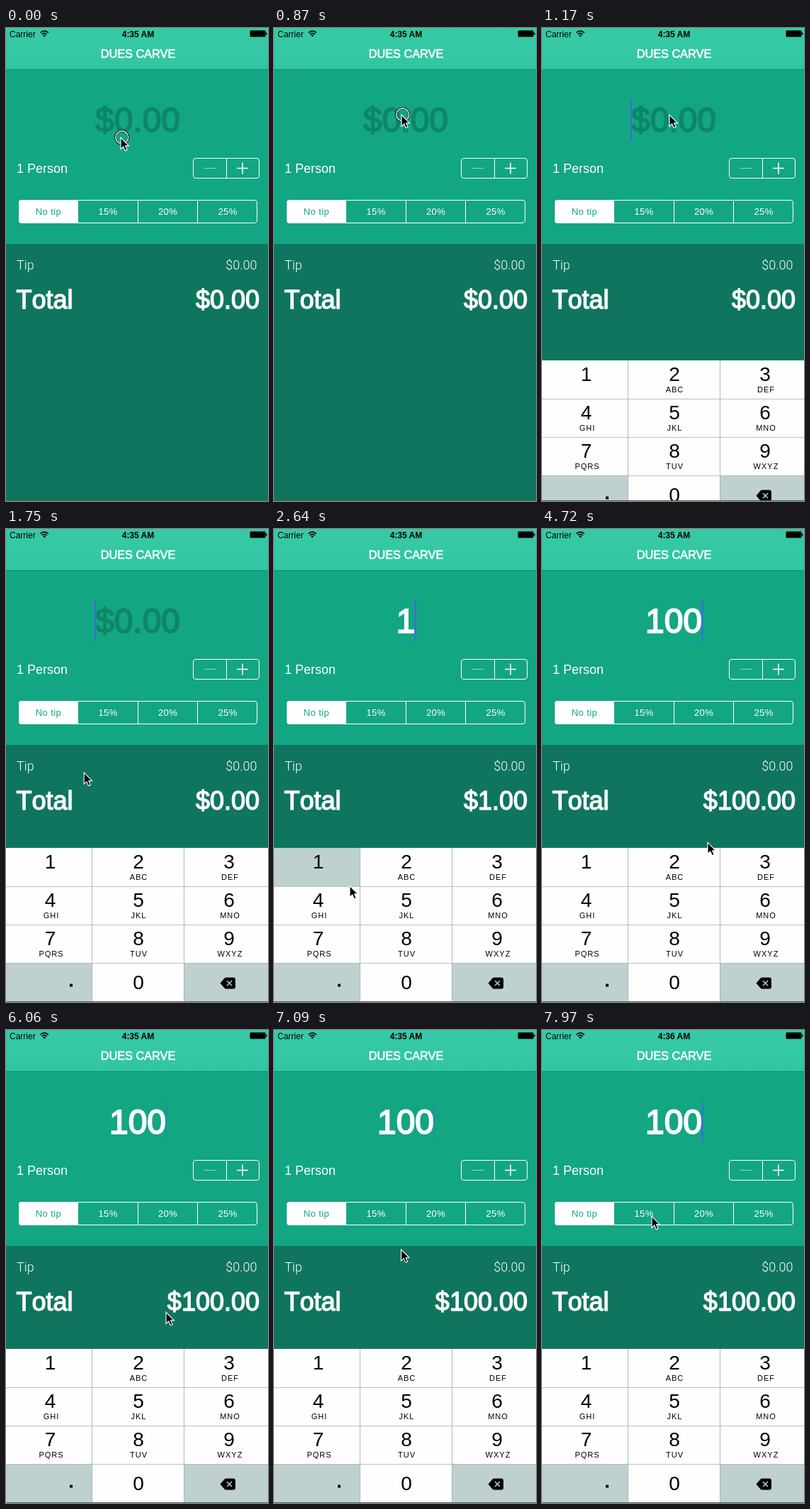
An HTML page for the animation above (8000 ms loop, 370 px wide and 666 px high).

```html
<!DOCTYPE html>
<html lang="en">
<head>
<meta charset="utf-8">
<title>Bill splitter</title>
<style>
  html, body { margin: 0; width: 100%; height: 100%; overflow: hidden; background: #0f755e; }
  svg { display: block; width: 370px; height: 666px; }
  text { font-family: "Liberation Sans", Arial, sans-serif; fill: #fff; }
  .mid { text-anchor: middle; }
  .end { text-anchor: end; }
  .medium { stroke: #fff; stroke-width: .038em; }
  .big { font-size: 48px; }
  .hint { fill: #0f8669; stroke: #0f8669; }
  .sum { font-size: 36px; font-kerning: none; }
  .body { font-size: 18px; }
  .light { font-family: Roboto, "Liberation Sans", sans-serif; font-weight: 300; }
  .seg { font-size: 13px; letter-spacing: .4px; }
  .status { font-size: 12px; fill: #000; }
  .digit { font-size: 28px; fill: #000; }
  .letters { font-size: 11px; letter-spacing: 1px; fill: #000; }
  .line { fill: none; stroke: #fff; }
</style>
</head>
<body>
<svg viewBox="0 0 370 666">
  <defs>
    <linearGradient id="bar" x2="0" y2="1">
      <stop stop-color="#37c9a6"/><stop offset="1" stop-color="#31c6a2"/>
    </linearGradient>
  </defs>
  <rect width="370" height="304" fill="#13a683"/>
  <rect width="370" height="58" fill="url(#bar)"/>
  <rect y="58" width="370" height="1" fill="#168a6e"/>
  <rect y="304" width="370" height="362" fill="#0f755e"/>

  <text class="status" x="5" y="12.5">Carrier</text>
  <g fill="none" stroke="#000" stroke-width="1.7">
    <path d="M48.6 6.6Q54.2 1.6 59.8 6.6M50.7 8.9Q54.2 5.8 57.7 8.9"/>
    <path d="M54.2 12.6L52.2 10.4Q54.2 8.8 56.2 10.4Z" fill="#000" stroke="none"/>
  </g>
  <text class="status mid" id="clock" x="186.5" y="12.5" font-weight="bold"></text>
  <rect x="344.5" y="3.5" width="22" height="9" rx="1.5" fill="none" stroke="#000" stroke-opacity=".55"/>
  <rect x="345" y="4" width="21" height="8" rx="1"/>
  <path d="M367 6q1.6 0 1.6 2t-1.6 2z"/>
  <text class="mid medium" x="186.5" y="42" font-size="16.3">DUES CARVE</text>

  <text class="big mid medium" id="amount" x="186" y="146"></text>
  <rect id="caret" y="100" width="2" height="58" fill="#3f68e4"/>

  <text class="body" x="15" y="204">1 Person</text>
  <rect class="line" x="264.5" y="183.5" width="93" height="28" rx="3.5"/>
  <path class="line" d="M311.5 183.5v28"/>
  <path class="line" d="M280 197.5h16" opacity=".55"/>
  <path class="line" d="M326 197.5h16M334 189.5v16" stroke-width="1.6"/>

  <path d="M102 242H22a4 4 0 0 0-4 4v25a4 4 0 0 0 4 4h80z" fill="#fff"/>
  <rect class="line" x="18.5" y="242.5" width="336" height="32" rx="3.5"/>
  <path class="line" d="M186.5 242.5v32M270.5 242.5v32"/>
  <g class="mid">
    <text class="seg" x="60" y="263" style="fill:#13a683">No tip</text>
    <text class="seg" x="144" y="263">15%</text>
    <text class="seg" x="228.5" y="263">20%</text>
    <text class="seg" x="313" y="263">25%</text>
  </g>

  <text class="body light" x="15" y="340">Tip</text>
  <text class="body light end" x="354.5" y="340">$0.00</text>
  <text class="sum medium" x="14.5" y="394.5">Total</text>
  <text class="sum end medium" id="total" x="358" y="394.5"></text>

  <g id="pad"></g>
  <rect y="665" width="370" height="1" fill="#44645f"/>

  <g id="cursor">
    <g id="ring" fill="none">
      <circle cx="1.7" cy="0" r="9.2" stroke="#000" stroke-width="2.8"/>
      <circle cx="1.7" cy="0" r="9" stroke="#fff" stroke-width="1.4"/>
    </g>
    <path d="M0 .4V16.4L3.7 13 6.3 18.8 9.1 17.7 6.6 11.9H11.4Z" stroke="#fff" stroke-width="1.1"/>
  </g>
</svg>
<script>
// The picture advances in beats; all times below are beats.
const LOOP = 8000, BEAT = 147.6, LEAD = 18;
const PAD_OPENS = 6.5, CARET_SHOWS = 7, BLINK_STARTS = 27, MINUTE_ENDS = 49;

// Pointer stops: it eases from one to the next
const STOPS = [
  { from: 0, to: 0, x: 162, y: 154 },
  { from: 2, to: 3, x: 240, y: 241 },
  { from: 6, to: 8, x: 180, y: 122 },
  { from: 15, to: 17, x: 68, y: 476 },
  { from: 18, to: 18, x: 107, y: 502 },
  { from: 20, to: 26, x: 182, y: 637 },
  { from: 32, to: 32, x: 234, y: 441 },
  { from: 35, to: 43, x: 226, y: 397 },
  { from: 54, to: 55, x: 155, y: 262 }
];

// A key types its digit one beat after the tap and stays grey while held
const TAPS = [
  { at: 0 }, { at: 6 },
  { at: 17, key: "1", hold: 2 },
  { at: 21, key: "0", hold: 1 },
  { at: 23, key: "0", hold: 1 }
];

const $ = id => document.getElementById(id);
const clamp = v => Math.min(1, Math.max(0, v));

function add(tag, attrs, text = "") {
  const el = document.createElementNS("http://www.w3.org/2000/svg", tag);
  for (const k in attrs) el.setAttribute(k, attrs[k]);
  el.textContent = text;
  return $("pad").appendChild(el);
}

const WHITE = "#fefefe", GREY = "#bfd0d1";
const COLS = [0, 121.5, 251.5, 370], MIDS = [62.5, 187, 315];
const LABELS = ["", "ABC", "DEF", "GHI", "JKL", "MNO", "PQRS", "TUV", "WXYZ"];
const keys = {};

[..."123456789.0<"].forEach((name, i) => {
  const c = i % 3, y = 449 + 54 * Math.floor(i / 3), mid = MIDS[c];
  const plain = ".<".includes(name);
  keys[name] = add("rect", {
    x: COLS[c], y, width: COLS[c + 1] - COLS[c], height: 54, fill: plain ? GREY : WHITE
  });
  if (plain) return;
  add("text", { class: "digit mid", x: mid, y: y + (name === "0" ? 36.5 : 29) }, name);
  if (LABELS[i]) add("text", { class: "letters mid", x: mid + (c === 1 ? .5 : 1.5), y: y + 44.5 }, LABELS[i]);
});
add("path", {
  d: "M0 503.5H370M0 557.5H370M0 611.5H370M121.5 449V665M251.5 449V665",
  stroke: "#a9b3b2", "stroke-width": .8
});
add("rect", { x: 90, y: 640.5, width: 4, height: 4, rx: .6 });
add("path", { d: "M302.5 639.5L308.5 632.4Q309.6 631.5 311 631.5H321Q324 631.5 324 634.5V644.5Q324 647.5 321 647.5H311Q309.6 647.5 308.5 646.6Z" });
add("path", { d: "M312 636l7 7M319 636l-7 7", stroke: GREY, "stroke-width": 1.5 });

function pointer(n) {
  const i = STOPS.findIndex(s => s.to >= n), b = STOPS[i];
  if (n >= b.from) return [b.x, b.y];
  const a = STOPS[i - 1];
  const k = Math.sin((n - a.to) / (b.from - a.to) * Math.PI / 2);
  return [a.x + (b.x - a.x) * k, a.y + (b.y - a.y) * k];
}

// Critically damped spring
function padOffset(n) {
  const u = Math.max(0, n - PAD_OPENS) * 2.68;
  return u ? Math.round(216 * (1 + u) * Math.exp(-u)) : 218;
}

// Solid while typing, then fades out and in every seven beats
function caretOpacity(n) {
  if (n < BLINK_STARTS) return n >= CARET_SHOWS ? 1 : 0;
  return clamp(Math.abs((n - BLINK_STARTS) % 7 - 1.4) - 1.1);
}

function draw(n) {
  const typed = TAPS.filter(tap => tap.key && n > tap.at).map(tap => tap.key).join("");
  const held = TAPS.filter(tap => n >= tap.at && n < tap.at + tap.hold).map(tap => tap.key);
  const half = 48 * .556 * typed.length / 2;
  $("amount").textContent = typed || "$0.00";
  $("amount").classList.toggle("hint", !typed);
  $("total").textContent = "$" + Number(typed).toFixed(2);
  $("clock").textContent = n < MINUTE_ENDS ? "4:35 AM" : "4:36 AM";
  $("caret").setAttribute("x", typed ? 185.5 + half : 125);
  $("caret").setAttribute("opacity", caretOpacity(n));
  $("pad").setAttribute("transform", `translate(0 ${padOffset(n)})`);
  for (const k of "10") keys[k].setAttribute("fill", held.includes(k) ? GREY : WHITE);
  $("cursor").setAttribute("transform", `translate(${pointer(n)})`);
  $("ring").setAttribute("opacity", TAPS.some(tap => tap.at === n) ? 1 : 0);
}

let start, shown;
function tick(now) {
  start ??= now;
  const n = Math.floor(((now - start) % LOOP + LEAD) / BEAT);
  if (n !== shown) draw(shown = n);
  requestAnimationFrame(tick);
}
draw(0);
requestAnimationFrame(tick);
</script>
</body>
</html>
```
